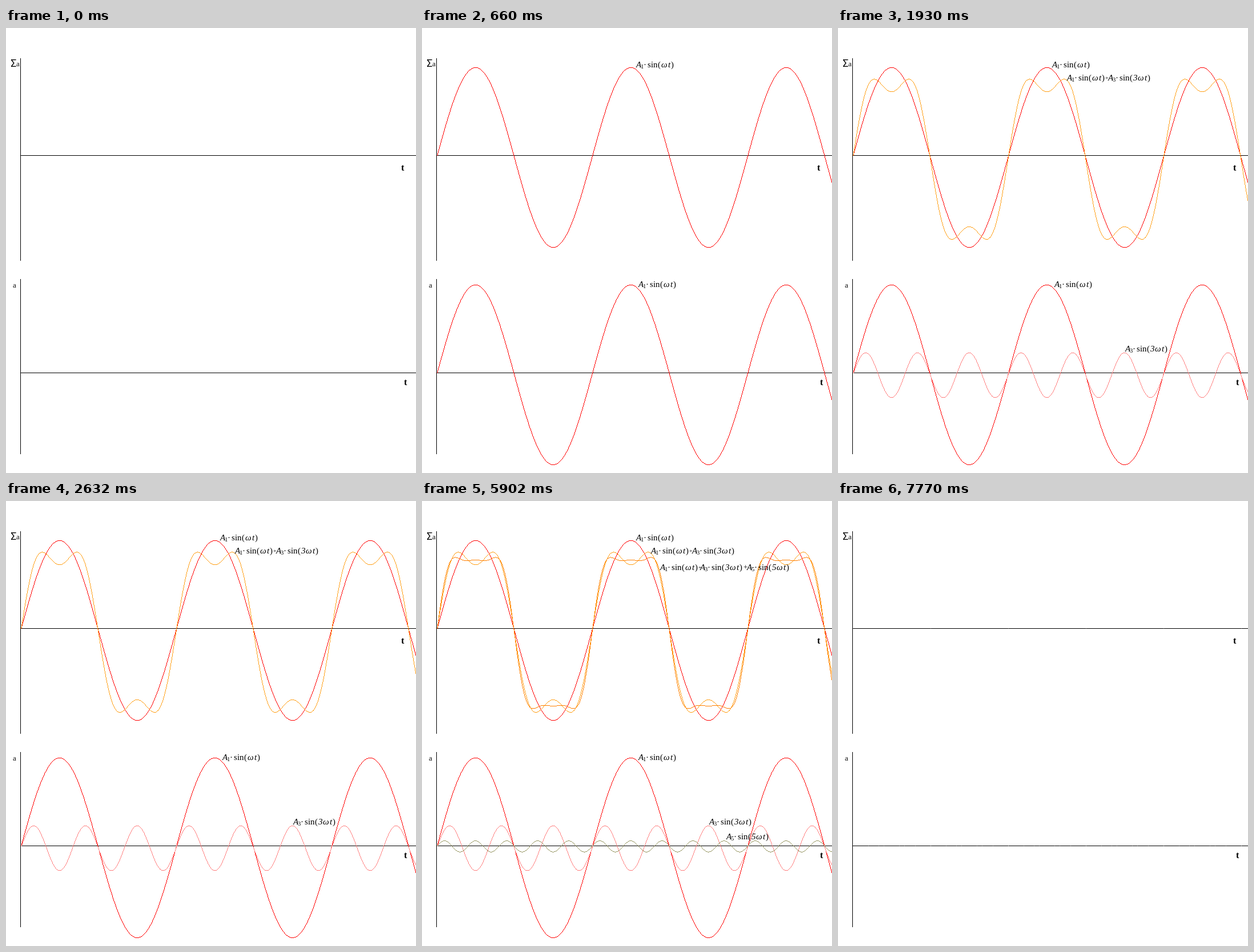
Recreate the animation shown at these times as a matplotlib script. Size 718 by 780 pixels, loop 8.02 s.

```python
import matplotlib.pyplot as plt
import numpy as np
from matplotlib.animation import FuncAnimation

W, H, DPI = 718, 780, 100
PT = 72 / DPI                       # points per pixel
STEP, LOOP = 20, 8020
CHANGES = (660, 1930, 3100, 7770)   # ms
X0, HALF = 25.8, 136                # first zero and half period of the sine
TOP, LOW = 223, 604                 # pixel rows of the two time axes
AMP = {1: 157.6, 3: 39.4, 5: 9.8}

RED, PINK, OLIVE = "#ff0000", "#ff8080", "#999966"
AMBER, ORANGE = "#ffa018", "#ff8000"

plt.rcParams.update({
    "font.family": "Liberation Serif",
    "mathtext.fontset": "custom",
    "mathtext.rm": "Liberation Serif",
    "mathtext.it": "Liberation Serif:italic",
    "mathtext.sf": "Liberation Serif:italic",
})

fig = plt.figure(figsize=(W / DPI, H / DPI), dpi=DPI, facecolor="white")
ax = fig.add_axes([0, 0, 1, 1])
ax.set(xlim=(0, W), ylim=(H, 0))
ax.axis("off")

edges = np.arange(26, W + 1)
w = (edges - X0) * np.pi / HALF


def text(px, py, s, size, **kw):
    return ax.text(px, py, s, fontsize=size * PT, va="baseline", **kw)


def bar(px, py, width, height):
    ax.add_patch(plt.Rectangle((px, py), width, height, color="black", lw=0,
                               antialiased=False, zorder=1))


def curve(row, mid, orders, color):
    """One-pixel curve: a run of pixels in each column."""
    y = mid - sum(AMP[n] * np.sin(n * w) for n in orders)
    y[0] = row + 0.5
    a, b = y[:-1], y[1:]
    lo, hi = np.round(np.minimum(a, b)), np.round(np.maximum(a, b))
    lo = np.where(hi > lo, lo, np.floor((a + b) / 2))
    hi = np.maximum(hi, lo + 1)
    return ax.stairs(hi, edges, baseline=lo, fill=True, color=color, lw=0,
                     antialiased=False, zorder=2)


def term(px, py, n):
    factor = "" if n == 1 else rf"\mathsf{{{n}}}"
    s = (rf"$A_{{\hspace{{-0.15}}{n}}}\hspace{{-0.05}}\mathrm{{·}}"
         rf"\hspace{{0.17}}\mathrm{{sin}}(\hspace{{0.13}}"
         rf"{factor}\omega\hspace{{0.14}}t\hspace{{0.06}})$")
    return text(px - 1.5, py, s, 15, zorder=4)


def plus(px, py, size):
    return text(px, py, "+", size, ha="center", zorder=4)


def gaps(row, xs):
    return ax.vlines(xs, row - 0.5, row + 1.5, color="white", alpha=0.45,
                     lw=PT, zorder=3)


for row in (TOP, LOW):
    bar(25, row, W - 25, 1)
bar(25, 53, 1, 355)
bar(25, 440, 1, 307)

text(7.8, 68, "Σ", 17.5, family="DejaVu Sans Mono")
text(17.8, 67, "a", 13)
text(12, 455, "a", 13)
text(691.8, 249.5, "t", 16, weight="bold")
text(697, 626.5, "t", 16, weight="bold")

first = [
    curve(TOP, 227, (1,), RED),
    curve(LOW, 607.9, (1,), RED),
    term(376, 69, 1), term(380, 454, 1),
]
second = [
    curve(LOW, 608.6, (3,), PINK),
    curve(TOP, 230.1, (1, 3), AMBER),
    term(401, 92, 1), plus(470, 91, 10), term(473, 92, 3),
    term(504, 567, 3),
]
third = [
    curve(LOW, 605.4, (5,), OLIVE),
    curve(TOP, 231.4, (1, 3, 5), ORANGE),
    term(418, 121, 1), plus(486, 120, 10), term(488, 121, 3),
    plus(566, 121, 13), term(569, 121, 5),
    term(533, 593, 5),
]
zeros = X0 + HALF * np.arange(6)
fine = np.concatenate([X0 + HALF / n * np.arange(1, 5 * n + 1) for n in (3, 5)])
traces = [gaps(TOP, zeros), gaps(LOW, fine)]

# stages in which each group is shown
GROUPS = ((first, (1, 2, 3)), (second, (2, 3)), (third, (3,)), (traces, (4,)))


def update(i):
    stage = sum((i + 1) * STEP > t for t in CHANGES)
    for artists, stages in GROUPS:
        for a in artists:
            a.set_visible(stage in stages)
    return []


anim = FuncAnimation(fig, update, frames=LOOP // STEP, interval=STEP,
                     init_func=lambda: update(0), repeat=True, repeat_delay=0)
plt.show()
```
